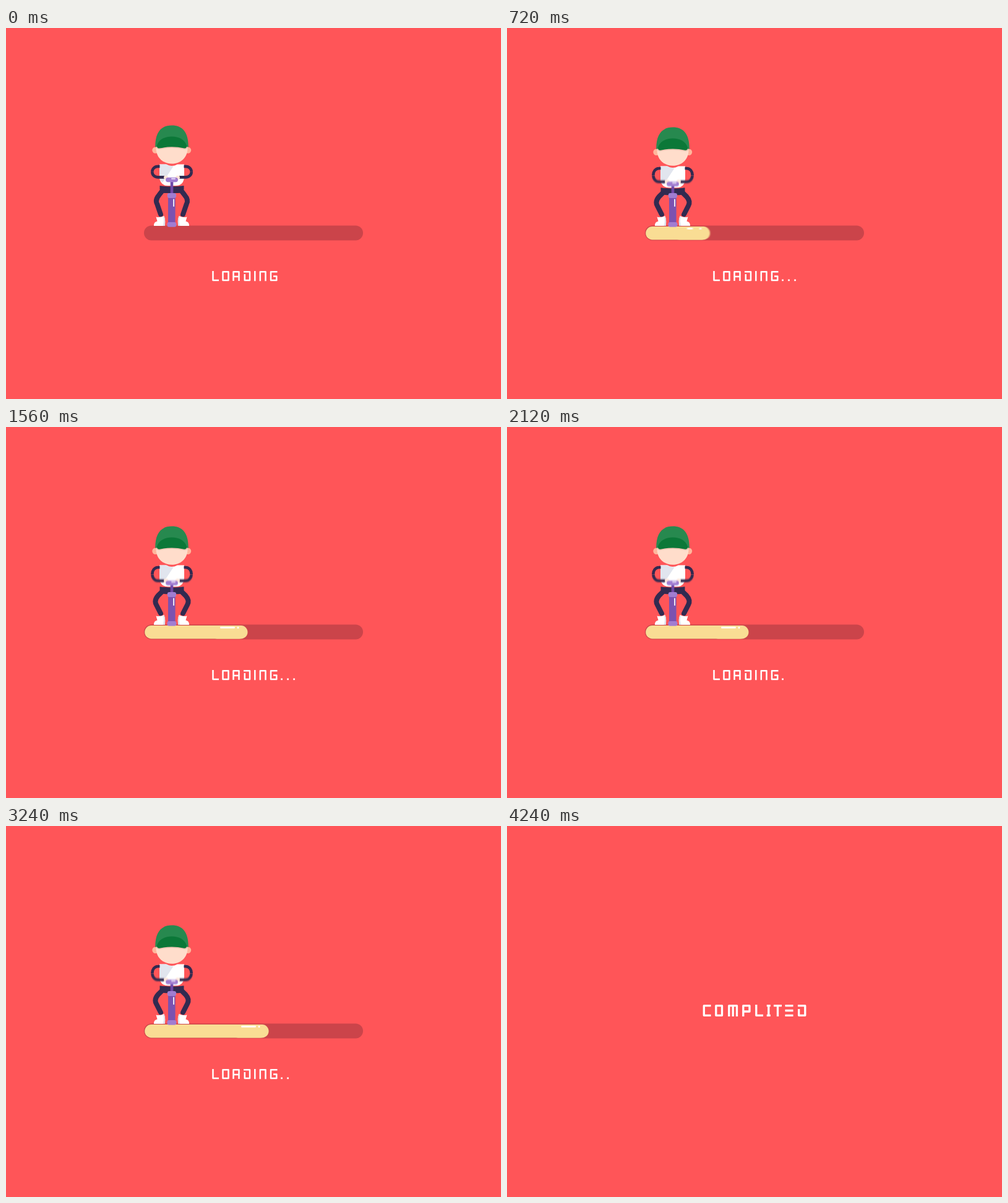
Animation, 800 px wide and 600 px high, one loop 5 s. Source, as an HTML page:

```html
<!DOCTYPE html>
<html lang="en">
<head>
<meta charset="utf-8">
<title>Loading</title>
<style>
  html, body { margin: 0; width: 100%; height: 100%; overflow: hidden; background: #ff5558; }
  svg { display: block; width: 100vw; height: 100vh; }
  .line { fill: none; stroke: #fff; stroke-linejoin: round; }
  .limb { fill: none; stroke: #322a50; stroke-linejoin: round; }
</style>
</head>
<body>
<svg viewBox="0 0 800 600">
  <defs>
    <filter id="pumpBlur" filterUnits="userSpaceOnUse" x="220" y="215" width="96" height="70">
      <feGaussianBlur stdDeviation="0 0"/>
    </filter>
    <filter id="barBlur" filterUnits="userSpaceOnUse" x="215" y="315" width="370" height="35">
      <feGaussianBlur stdDeviation="0 0"/>
    </filter>
    <g id="shoe">
      <path fill="#fff" d="M239 320C239 315 241 313.5 244.500 312.500L242.500 305.500Q249 307 255.500 304Q258 311 256.500 320Z"/>
      <path fill="#dfe3ec" d="M254 305L255.500 304Q258.500 311 256.500 320H253.500Q256 313 254 305Z"/>
    </g>
  </defs>

  <g id="loading">
    <rect x="223" y="319.500" width="354" height="24" rx="12" fill="#cb444a"/>
    <g id="bar">
      <rect id="barBody" x="224.200" y="321" height="21.400" rx="10.700" fill="#f9dd94"/>
      <g filter="url(#barBlur)">
        <rect id="barTip" y="321" height="21.400" rx="10.700" fill="#f9dd94"/>
        <rect id="shine" y="323" height="2.800" rx="1.400" fill="#fff"/>
        <circle id="glint" cy="324.400" r="1.500" fill="#fff"/>
      </g>
    </g>

    <g id="legs">
      <path class="limb" stroke-width="8" stroke-linecap="round"/>
      <path class="limb" stroke-width="8" stroke-linecap="round" transform="translate(536 0) scale(-1 1)"/>
    </g>
    <use href="#shoe"/>
    <use href="#shoe" transform="translate(535 0) scale(-1 1)"/>

    <g id="body">
      <path fill="#322a50" d="M248.500 255Q268 257.500 287.500 255V261Q285 267 278 267H258Q251 267 248.500 261Z"/>
      <path fill="#fff" d="M248 220.300H259Q268 225.500 277 220.300H288V241Q287 255 274 255H262Q249 255 248 241Z"/>
      <path fill="#e1e5ee" d="M248 220.300H259Q265 224 271 223L253 250Q248.500 247 248 241Z"/>
      <circle cx="241.500" cy="197.500" r="5.200" fill="#ffb69c"/>
      <circle cx="294" cy="197.500" r="5.200" fill="#ffb69c"/>
      <path fill="#ffddcb" d="M242.500 188H293.500V194C293.500 210 282 219.500 268 219.500S242.500 210 242.500 194Z"/>
      <path fill="#eec5b3" d="M243 192H293V194.500Q290 197 287 196Q268 192 249 196Q246 197 243 194.500Z"/>
      <path fill="#27894f" d="M241.200 192.500C241 168 251 157.400 268 157.400S295 168 294.800 192.500Q268 188 241.200 192.500Z"/>
      <path fill="#0b7838" d="M244 190C247 180 257 175.300 268 175.300S289 180 292 190Q292.500 194.700 288 194.500Q268 190 248 194.500Q243.500 194.700 244 190Z"/>
    </g>

    <g id="upperArms">
      <path class="limb" stroke-width="4.600"/>
      <path class="limb" stroke-width="4.600" transform="translate(536 0) scale(-1 1)"/>
    </g>
    <g filter="url(#pumpBlur)">
      <g id="lowerArms">
        <path class="limb" stroke-width="4.600"/>
        <path class="limb" stroke-width="4.600" transform="translate(536 0) scale(-1 1)"/>
      </g>
      <g id="handle">
        <rect x="265.700" y="248" width="4.600" height="22" fill="#7047a8"/>
        <rect x="255" y="238.500" width="7" height="6" rx="3" fill="#ffe6d9"/>
        <rect x="274" y="238.500" width="7" height="6" rx="3" fill="#ffe6d9"/>
        <path fill="#a17dd1" d="M262 241.500H274Q278 241.500 278 245.300T274 249H262Q258 249 258 245.300T262 241.500Z"/>
        <rect x="267" y="242.600" width="7" height="2" rx="1" fill="#e9def5"/>
      </g>
    </g>
    <g id="pump">
      <rect x="262" y="272" width="11.600" height="44" fill="#7b52b0"/>
      <rect x="260.800" y="267" width="14.200" height="8" rx="3" fill="#a17dd1"/>
      <rect x="260.500" y="314" width="14.800" height="7.800" rx="3" fill="#a17dd1"/>
      <rect x="270.200" y="276.500" width="1.700" height="12.500" rx=".8" fill="#fff"/>
    </g>

    <g role="img" aria-label="LOADING">
      <path class="line" stroke-width="2.500" d="M334.500 393V408H344M350.500 394.200H359.500V408H350.500ZM367.500 409V394.200H376.500V409M367.500 402H376.500M384 394.200H394V408H385.800V398M402.300 393V409.200M410.800 409.200V394.200H419.500V409.200M438.500 394.200H428V408H437.300V401.500H432"/>
      <g id="dots" fill="#fff">
        <rect x="444.200" y="406.500" width="2.700" height="2.700"/>
        <rect x="454.200" y="406.500" width="2.700" height="2.700"/>
        <rect x="464.200" y="406.500" width="2.700" height="2.700"/>
      </g>
    </g>
  </g>

  <g id="done" role="img" aria-label="COMPLITED">
    <path class="line" stroke-width="3.300" d="M329.500 290.700H318.300V306.300H329.500M337.800 290.700H347.500V306.300H337.800ZM358.800 308V290.700H371.500V308M365.200 290.700V308M381.800 308V290.700H392V300H381.800M402.800 289V306.300H414M419.800 290.700H425.800M419.800 306.300H425.800M422.800 290.700V306.300M431 290.700H444M437.500 290.700V308M449.500 290.700H462.500M449.500 298.500H462.500M449.500 306.300H462.500M470 290.700H481.800V306.300H471.700V296"/>
  </g>
</svg>

<script>
const LOOP = 5000, STEP = 40, DONE_AT = 4240;
const PUMP_PERIOD = 560, DOT_PERIOD = 920;
const BAR_LEFT = 224.2;
const $ = id => document.getElementById(id);
const clamp = x => Math.min(1, Math.max(0, x));
const ramp = (t, from, to) => clamp((t - from) / (to - from));
const ease = x => x * x * (3 - 2 * x);
const setAttrs = (el, attrs) => {
  for (const name in attrs) el.setAttribute(name, attrs[name]);
};
const setPaths = (id, d) => {
  for (const path of $(id).children) path.setAttribute('d', d);
};
const setBlur = (id, x, y) =>
  $(id).firstElementChild.setAttribute('stdDeviation', `${x.toFixed(3)} ${y.toFixed(3)}`);

// Right end of the filled bar.
const barEdge = t => 246
  + 144.5 * ease(ramp(t, 0, 1320))
  + 34.5 * ease(ramp(t, 2400, 3300))
  + 151 * ease(ramp(t, 3400, 4165));

function drawBar(t) {
  const edge = barEdge(t);
  const tipStart = Math.max(BAR_LEFT, edge - 60);
  const shineWidth = 24 * ramp(t, 400, 1240);
  const speed = (barEdge(t + 10) - barEdge(t - 10)) / 20;
  $('bar').style.display = t > 0 ? '' : 'none';
  $('barBody').setAttribute('width', edge - 3 - BAR_LEFT);
  setAttrs($('barTip'), { x: tipStart, width: edge - tipStart });
  setAttrs($('shine'), { x: edge - 32.5 - shineWidth / 2, width: shineWidth });
  setAttrs($('glint'), { cx: edge - 15.5, r: 1.5 * ramp(t, 300, 600) });
  setBlur('barBlur', speed * 7, 0);
}

function drawWorker(t) {
  const angle = 2 * Math.PI * (t - 20) / PUMP_PERIOD;
  const press = (1 - Math.cos(angle)) / 2;
  const drop = 6.4 * press, push = 14 * press;
  const top = 223.8 + drop, bottom = 241.2 + push * 1.15 - press;
  const middle = (top + bottom) / 2;

  $('body').setAttribute('transform', `translate(0 ${drop})`);
  $('handle').setAttribute('transform', `translate(0 ${push})`);
  setPaths('upperArms',
    `M248.5 ${top}H246C239.5 ${top} 236.3 ${(top + middle) / 2} 236.3 ${middle}`);
  setPaths('lowerArms',
    `M236.3 ${middle}C236.3 ${(bottom + middle) / 2} 239.5 ${bottom} 246 ${bottom}H256`);

  const knee = 243.4 - 3 * press, kneeY = 278 + 5 * press;
  setPaths('legs',
    `M254 ${261.5 + drop}L${knee + 4} ${kneeY - 8}Q${knee - 3} ${kneeY} ${knee + 1} ${kneeY + 7}L250 301.5`);
  setBlur('pumpBlur', 0, 1.1 * Math.abs(Math.sin(angle)));
}

function drawDots(t) {
  const phase = t % DOT_PERIOD;
  const fade = 1 - ramp(phase, 720, DOT_PERIOD);
  [...$('dots').children].forEach((dot, i) => {
    const start = 120 + 200 * i;
    dot.setAttribute('opacity', ramp(phase, start, start + 80) * fade);
  });
}

function draw(t) {
  const finished = t >= DONE_AT;
  $('loading').style.display = finished ? 'none' : '';
  $('done').style.display = finished ? '' : 'none';
  if (finished) return;
  drawBar(t);
  drawWorker(t);
  drawDots(t);
}

const startTime = performance.now();
function tick() {
  const t = (performance.now() - startTime) % LOOP;
  draw(Math.floor(t / STEP) * STEP);
  requestAnimationFrame(tick);
}
tick();
</script>
</body>
</html>
```
